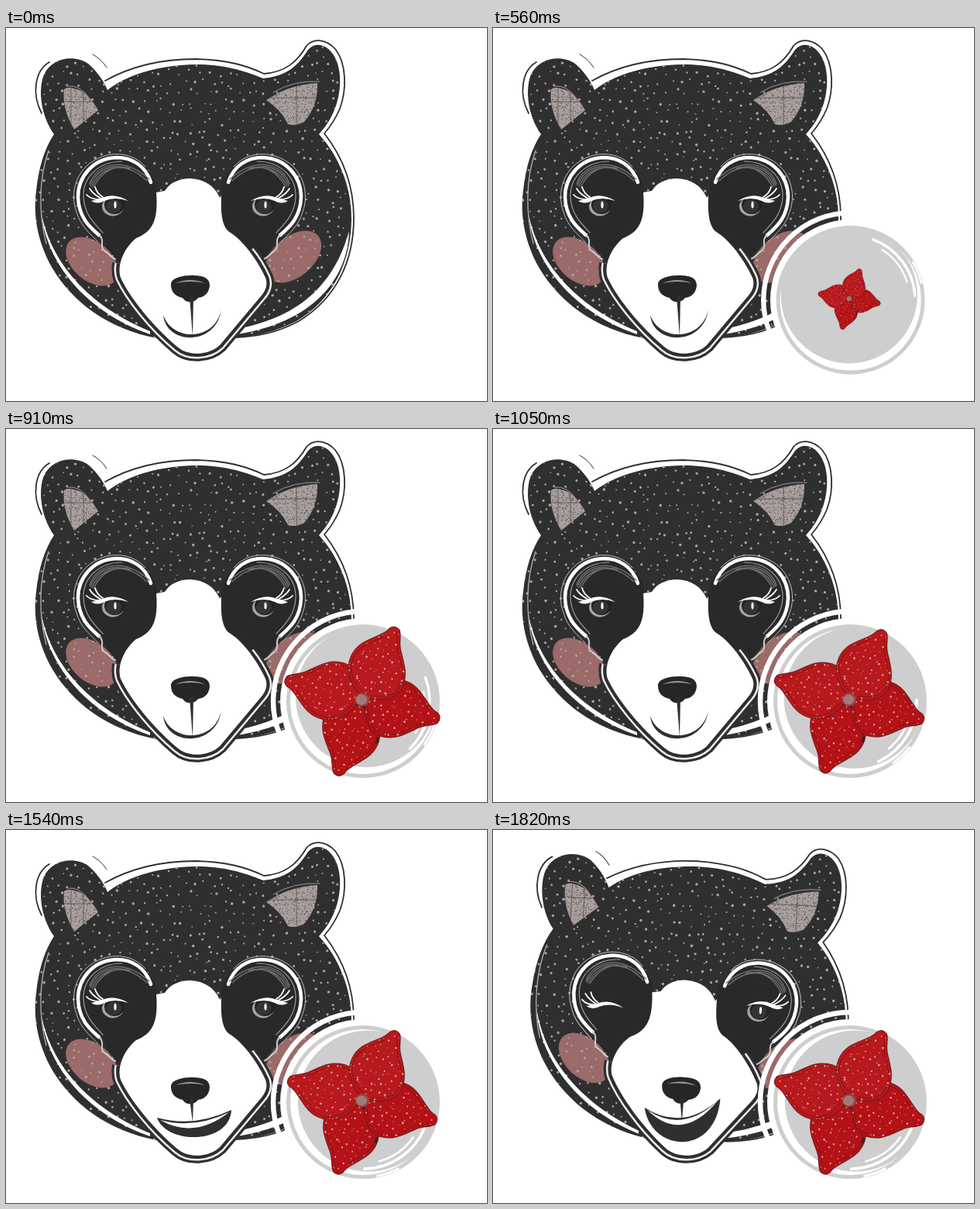
These frames come from a looping animation (621 by 481 pixels, 2520 ms). An HTML page with a canvas:

```html
<!DOCTYPE html>
<html lang="en">
<head>
<meta charset="utf-8">
<title>Winking bear with a flower</title>
<style>
html, body { margin: 0; width: 100%; height: 100%; overflow: hidden; background: #fff; }
canvas { display: block; }
</style>
</head>
<body>
<canvas width="621" height="481"></canvas>
<script>
const ctx = document.querySelector('canvas').getContext('2d');
const DARK = '#2f2f2f', PATCH = '#292929', GREY = '#cecece', WHITE = '#fff';
const LOOP = 2520, STEP = 70, LAST = 1820, RAD = Math.PI / 180;

const path = d => new Path2D(d);
const clamp = v => Math.max(0, Math.min(1, v));

function fill(p, color) {
  ctx.fillStyle = color;
  ctx.fill(p);
}
function stroke(p, color, width) {
  ctx.strokeStyle = color;
  ctx.lineWidth = width;
  ctx.stroke(p);
}
function within(draw) {
  ctx.save();
  draw();
  ctx.restore();
}
function oval(x, y, rx, ry, color, turn = 0) {
  ctx.beginPath();
  ctx.ellipse(x, y, rx, ry, turn * RAD, 0, 7);
  ctx.fillStyle = color;
  ctx.fill();
}
function arc(r, from, to, color, width) {
  ctx.beginPath();
  ctx.arc(0, 0, r, from * RAD, to * RAD);
  ctx.strokeStyle = color;
  ctx.lineWidth = width;
  ctx.stroke();
}

// Jittered grid of dots with a fixed seed
function scatter(x0, y0, x1, y1, gap, rMin, rMax, seed) {
  const p = new Path2D();
  const rnd = () => (seed = seed * 16807 % 2147483647) / 2147483647;
  for (let y = y0, row = 0; y < y1; y += gap, row++)
    for (let x = x0 + row % 2 * gap / 2; x < x1; x += gap) {
      const px = x + (rnd() - .5) * gap * .8, py = y + (rnd() - .5) * gap * .8;
      const r = rMin + rnd() * (rMax - rMin);
      p.moveTo(px + r, py);
      p.arc(px, py, r, 0, 7);
    }
  return p;
}

const head = path('M62 137C45 113 41 80 49 60C60 38 88 34 106 46C120 58 128 72 131 80C160 58 200 48 245 47C280 47 305 54 332 65C362 62 376 50 390 28C399 18 412 21 420 31C433 46 434 75 427 97C422 114 413 127 404 137C430 165 446 205 446 245C446 300 423 350 375 378C340 395 320 398 290 399L195 400C130 388 85 352 60 310C40 275 35 240 39 210C42 180 50 155 62 137Z');
const outline = path('M128 68C160 50 200 40 245 40C285 41 310 48 333 59C360 57 376 44 388 23C398 12 414 15 425 27C440 46 440 80 431 104C425 118 418 128 411 136C436 168 449 205 449 245C449 300 427 348 378 378C350 393 325 398 296 399M46 110C33 85 37 55 56 44');
const earArc = path('M112 34Q123 40 130 51');
const rims = path('M46 240C52 300 100 365 186 395L186 391C115 362 60 310 46 240ZM443 262C441 325 395 380 298 395L298 388C385 372 425 325 443 262Z');
const rimLine = path('M55 158C42 195 42 240 52 278');
const ears = path('M75 79Q72 104 88 131L119 106Q105 82 91 79Q80 75 75 79ZM336 93Q365 73 402 71Q403 100 385 121Q374 127 364 124Q355 105 336 93Z');
const earWeave = path('M70 95H120M84 75V125M100 75V125M340 90H404M375 70V126');
const earLine = path('M79 75Q96 73 107 90M345 83Q372 67 405 69');

const patch = path('M196 212C192 180 168 169 143 169C112 170 95 194 95 218C96 246 112 258 123 268C130 282 138 296 147 301C155 280 200 272 196 240Z');
const patchRim = path('M187 199C180 177 162 167 143 167C112 168 93 192 93 218C94 246 110 258 120 267');
const patchTail = path('M120 267C129 274 119 282 128 288C133 290 134 295 141 298');
const patchLine = path('M180 179C165 161 138 158 117 169C90 182 82 214 91 237C96 256 110 266 119 276');
const patchInner = path('M150 172C118 172 99 194 100 218C101 240 114 252 125 264');
const brows = path('M108 201C117 174 152 165 185 195M109 203C120 176 150 168 182 197M111 204C122 180 148 172 174 190M113 205C124 184 141 176 160 181');
const lid = path('M110 223Q118 221 124 219Q140 212 158 223Q140 217 127 223Q118 228 110 223Z');
const lashes = path('M125 221Q110 222 104 215M123 220Q112 214 108 207M125 218Q117 213 115 205');

const muzzle = path('M194 212L205 210C212 199 224 194 238 194C256 195 269 203 276 219L278 216C277 240 279 258 290 264C308 276 326 302 335 322C338 330 336 338 329 346L276 409C262 422 236 424 221 411C190 385 160 348 148 322C143 306 152 284 168 271C188 263 197 250 194 212Z');
const jaw = path('M147 304C146 310 146 316 148 322C160 348 190 385 221 411C236 424 262 422 276 409L329 346C336 338 338 330 335 322C330 311 323 299 314 288');
const nose = path('M213 331C213 322 228 319 240 319C254 319 263 322 263 332C262 343 255 347 248 348C243 355 232 355 228 348C218 346 213 340 213 331Z');
const noseShine = path('M219 329Q238 321 257 329Q238 325 219 329Z');
const smile = path('M203 370C207 410 272 410 278 363C270 404 215 405 203 370Z');

const furDots = scatter(40, 20, 450, 400, 12.6, .8, 1.8, 77);
const earSpecks = scatter(70, 65, 410, 135, 3, .3, 1, 19);

const petal = path('M4 0C8 -18 22 -35 42 -36C62 -37 72 -23 84 -14Q90 -9 95 -8Q102 -4 98 4C91 10 84 9 75 17C62 28 52 38 34 38C16 37 8 18 4 0Z');
const petalFold = path('M10 -6C14 -19 25 -32 42 -33C60 -33 70 -20 82 -11M94 3C84 8 80 8 71 16C58 28 48 35 34 35C20 34 14 22 9 8');
const petalDots = scatter(10, -36, 98, 38, 8.5, .5, 1.4, 41);
const petalBase = path('M44 -35C24 -34 10 -18 6 0C10 18 18 34 34 36');
const petalAngles = [110, 16, 196, -63];

function drawEye(x, shut) {
  if (shut > .95) return;
  within(() => {
    ctx.translate(x, 233);
    ctx.scale(1, 1 - shut);
    oval(-1, -3, 14, 12.5, '#a5a5a5');
    oval(1, -5, 13, 12, '#222');
    oval(0, -3, 10, 9, '#343434');
    oval(2, -5, 1.6, 4.5, WHITE);
  });
}

function drawLid(drop) {
  ctx.translate(0, drop);
  fill(lid, WHITE);
  stroke(lashes, WHITE, 1.8);
}

function mirrored(draw) {
  within(() => {
    ctx.transform(-1, 0, 0, 1, 474, 0);
    draw();
  });
}

function drawPatch() {
  fill(patch, PATCH);
  stroke(patchLine, '#bbb', 1);
  stroke(patchRim, WHITE, 4.5);
  stroke(patchTail, '#ccc', 2);
  stroke(patchInner, '#999', 1.2);
  stroke(brows, '#6e6e6e', 1.4);
}

function drawMouth(open, k) {
  const lx = 195 - 3 * k, ly = 371 - 10 * k, rx = 291 - 2 * k, ry = 361 - 17 * k;
  fill(path(`M237 346L241 ${open ? 377 : 398}L242 346Z`), DARK);
  if (!open) return fill(smile, DARK);
  const top = 384 + 6 * k, low = 406 + 13 * k;
  fill(path(`M${lx} ${ly}Q243 ${top} ${rx} ${ry}C${rx - 2} ${low} ${lx + 12} ${low} ${lx} ${ly}Z`), DARK);
  fill(path(`M${lx + 4} ${ly + 3}Q243 ${top + 2} ${rx - 3} ${ry + 3}Q243 ${top + 15} ${lx + 4} ${ly + 3}Z`), WHITE);
}

function drawBear(t) {
  const k = clamp((t - 1540) / 280);
  ctx.translate(250, 430);
  ctx.rotate(3 * RAD * k);
  ctx.translate(-250, -430);

  fill(head, DARK);
  stroke(outline, DARK, 1.8);
  stroke(earArc, DARK, 1);
  oval(111, 301, 39, 25, '#9b6a69', 40);
  oval(371, 295, 42, 26, '#9b6a69', -40);
  within(() => {
    ctx.clip(head);
    fill(furDots, '#a8a6a6');
  });
  fill(rims, WHITE);
  stroke(rimLine, '#bbb', 1.2);
  fill(ears, '#aaa19f');
  within(() => {
    ctx.clip(ears);
    fill(earSpecks, '#635b59');
    stroke(earWeave, '#554e4d', .8);
  });
  stroke(earLine, '#999', 1);

  drawPatch();
  mirrored(drawPatch);
  drawEye(139, k);
  drawEye(333, 0);
  within(() => drawLid(11 * k));
  mirrored(() => drawLid(0));

  within(() => {
    ctx.lineCap = 'butt';
    stroke(jaw, DARK, 20);
    stroke(jaw, '#eee', 13.5);
    stroke(jaw, DARK, 8.5);
  });
  fill(muzzle, WHITE);
  fill(nose, '#262626');
  fill(noseShine, '#999');
  drawMouth(t >= 1540, k);
}

function drawDisc(t) {
  const s = 1 - (1 - clamp(t / 680)) ** 2;
  if (!s) return;
  const glint = Math.min(57, (t - 280) * .14 - 75);
  const lean = (glint - 70) * RAD;
  ctx.translate(480 - 19 * s, 343 + 8 * s);
  ctx.scale(s, s);
  oval(0, 0, 107, 107, WHITE);
  arc(116, 0, 360, WHITE, 6.5);
  oval(0, 0, 99, 99, GREY);
  oval(0, 0, 94, 94, WHITE);
  oval(7 * Math.cos(lean), 7 * Math.sin(lean), 91, 91, GREY);
  arc(86, glint - 34, glint + 32, WHITE, 3.5);
  arc(79, glint - 22, glint + 18, WHITE, 2.5);
  arc(97, glint + 5, glint + 22, WHITE, 3);
}

function drawFlower(t) {
  if (t < 560) return;
  const q = clamp((t - 513) / 470) - 1;
  const s = 1 + 2.7 * q ** 3 + 1.7 * q ** 2;
  ctx.translate(460, 349);
  ctx.rotate(7 * RAD * q);
  ctx.scale(s, s);
  petalAngles.forEach((angle, i) => within(() => {
    ctx.rotate(angle * RAD);
    stroke(petal, '#6b1a1a', 2);
    fill(petal, i < 2 ? '#b41216' : '#b8191c');
    stroke(petalFold, '#8c1114', 1);
    ctx.clip(petal);
    fill(petalDots, '#d3a29f');
    if (!i) {
      ctx.setLineDash([4, 6]);
      stroke(petalBase, '#352424', 4);
    }
  }));
  oval(0, 0, 9, 8.5, '#8c4b49');
  oval(-1, 0, 7, 6.5, '#a27b78');
}

function frame(now) {
  const t = Math.min(Math.floor(now % LOOP / STEP) * STEP, LAST);
  ctx.fillStyle = WHITE;
  ctx.fillRect(0, 0, 621, 481);
  [drawBear, drawDisc, drawFlower].forEach(part => within(() => part(t)));
  requestAnimationFrame(frame);
}
ctx.lineCap = 'round';
ctx.lineJoin = 'round';
requestAnimationFrame(frame);
</script>
</body>
</html>
```
